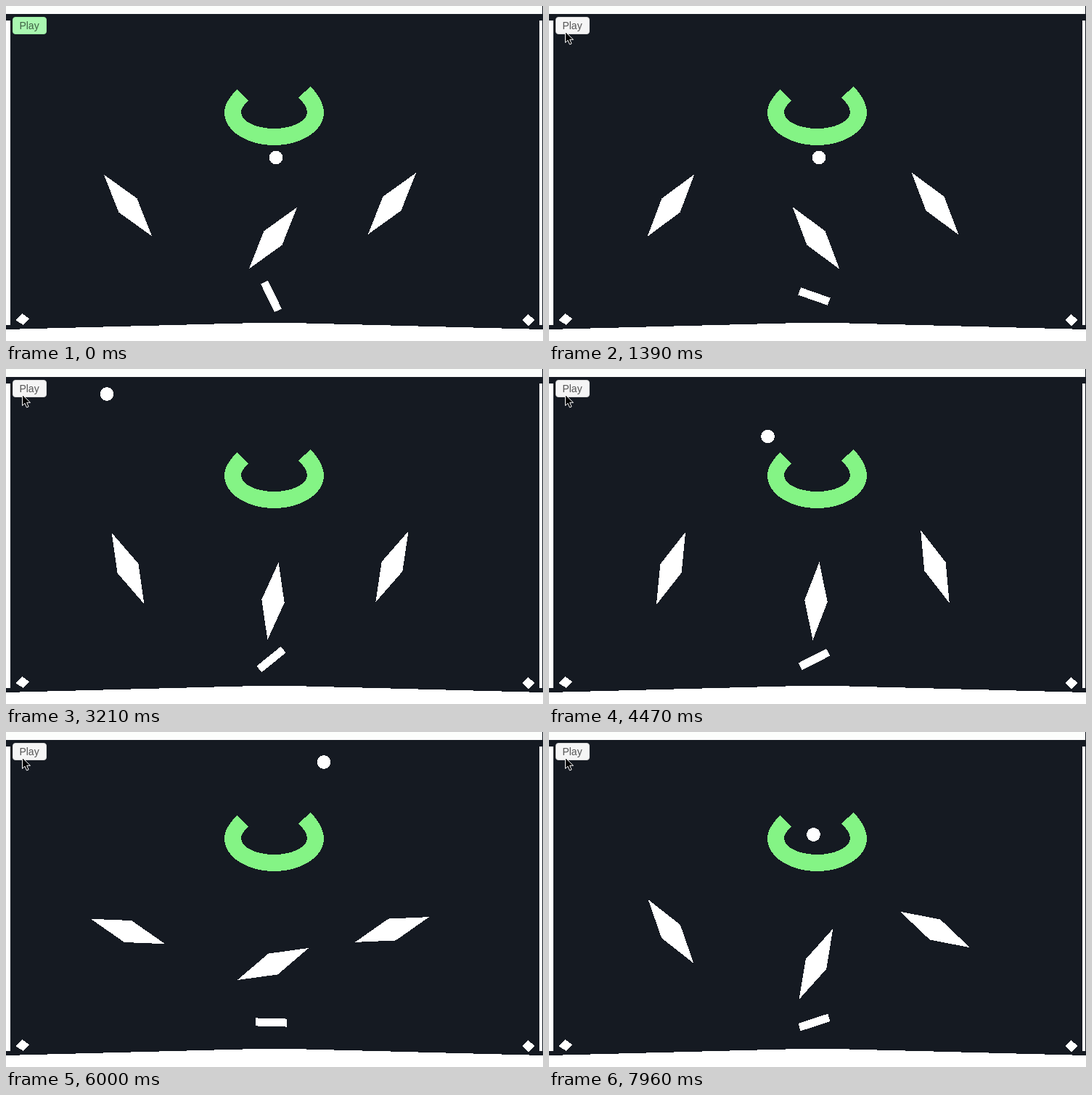
Animation of 740 by 462 pixels, one loop 8000 ms. Source, as an HTML page:

```html
<!DOCTYPE html>
<html lang="en">
<head>
<meta charset="utf-8">
<title>Spinner pinball</title>
<style>
  html, body { margin: 0; width: 100%; height: 100%; overflow: hidden; background: #fff; }
  svg { display: block; width: 740px; height: 462px; }
  text { font: 14px "Liberation Sans", Arial, sans-serif; }
</style>
</head>
<body>
<svg viewBox="0 0 740 462">
  <defs><path id="blade" d="M-54 0L0 -15.8L54 0L0 15.8Z"/></defs>
  <g shape-rendering="crispEdges">
    <rect width="740" height="462" fill="#fff"/>
    <rect width="740" height="11" fill="#fcfefc"/>
    <g fill="#151a22">
      <rect y="11" width="740" height="9"/>
      <rect x="6" y="11" width="729" height="435"/>
      <rect y="440" width="740" height="6"/>
      <rect x="739" width="1" height="462"/>
    </g>
    <g fill="#fff">
      <path d="M0 446L345 437H395L740 446V462H0Z"/>
      <path d="M13 433L22 424L32 431L24 440Z"/>
      <path d="M711 433L719 425L729 433L720 441Z"/>
      <circle id="ball" r="9.4"/>
      <use id="left" href="#blade"/>
      <use id="right" href="#blade"/>
      <use id="middle" href="#blade"/>
      <rect id="bar" x="-21.5" y="-5.5" width="43" height="11"/>
    </g>
    <path fill="#84f485" d="M318.5 115L334 131Q324 139 324 146.5A45.5 22.5 0 0 0 415 146.5Q415 138 403 126L420 111Q438 131 438 147A68.5 45 0 0 1 301 147Q301 132 318.5 115Z"/>
  </g>
  <rect id="button" x="9.5" y="15.5" width="46" height="23" rx="3.5"/>
  <text id="label" x="18.4" y="32">Play</text>
  <path id="cursor" d="M0 0V15L3.5 11.8L6 17.5L8.6 16.4L6.2 10.8H11Z" fill="#000" stroke="#fff"/>
</svg>
<script>
  const LOOP = 8000;
  const $ = id => document.getElementById(id);

  // Angles in degrees that each spinner passes at the shared moments
  const moments = [0, 1390, 3210, 4470, 6000, 7120, 7960];
  const spinners = [
    { id: 'left', x: 168, y: 275, angles: [52, -53, -114.5, -248.2, -341.4, -540, -665.5] },
    { id: 'right', x: 532, y: 272.5, angles: [128, 233, 294.8, 428.5, 521.2, 683.2, 747.3] },
    { id: 'middle', x: 368, y: 320, angles: [128, 233, 278.1, 454.8, 515.8, 675.4, 835.6] },
    { id: 'bar', x: 365.5, y: 400.5, angles: [64, 19.3, -39, -207, -358.5, -460, -558] }
  ];

  // The ball flies straight from stop to stop, rebounding off the walls;
  // hits counts the rebounds on the way there, signed by the first direction.
  const walls = { x: [19, 719], y: [20, 427] };
  const stops = [
    { time: 1440, x: 372, y: 209 },
    { time: 3210, x: 139, y: 34.5, hits: { x: 5, y: 5 } },
    { time: 4470, x: 301.5, y: 93, hits: { x: -1, y: -2 } },
    { time: 6000, x: 438, y: 41.5, hits: { x: -1, y: -2 } },
    { time: 7120, x: 497, y: 41, hits: { x: 0, y: -1 } },
    { time: 7960, x: 364.5, y: 141.5, hits: { x: 2, y: 2 } }
  ];

  const mix = (a, b, part) => a + (b - a) * part;
  const clamp = v => Math.min(1, Math.max(0, v));

  function segment(times, time) {
    const last = times.length - 2;
    const i = Math.min(last, Math.max(0, times.findLastIndex(t => t <= time)));
    return [i, clamp((time - times[i]) / (times[i + 1] - times[i]))];
  }

  function rebound(from, to, hits, [low, high], part) {
    const span = high - low;
    const image = (hits % 2 ? low + high - to : to) + hits * span;
    const offset = mix(from, image, part) - low;
    const wrapped = ((offset % (2 * span)) + 2 * span) % (2 * span);
    return low + (wrapped > span ? 2 * span - wrapped : wrapped);
  }

  function ballAt(time) {
    const [i, part] = segment(stops.map(stop => stop.time), time);
    const from = stops[i], to = stops[i + 1];
    return ['x', 'y'].map(axis => rebound(from[axis], to[axis], to.hits[axis], walls[axis], part));
  }

  // The pointer comes up the left edge, then moves down onto the button
  function cursorAt(time) {
    const rise = clamp((time - 300) / 300), settle = clamp((time - 600) / 370);
    return [mix(1, 22.5, settle), mix(414, 2, rise) + 33.5 * settle];
  }

  // The picture advances in 70 ms ticks, with two shorter ones
  function tick(time) {
    if (time < 60) return 0;
    const start = time < 4530 ? 60 : 4530;
    return start + Math.floor((time - start) / 70) * 70;
  }

  const place = (id, [x, y], angle = 0) =>
    $(id).setAttribute('transform', `translate(${x} ${y}) rotate(${angle})`);

  function draw(time) {
    const [i, part] = segment(moments, time);
    for (const { id, x, y, angles } of spinners) place(id, [x, y], mix(angles[i], angles[i + 1], part));
    place('ball', ballAt(time));
    place('cursor', cursorAt(time));
    $('cursor').style.display = time < 300 ? 'none' : '';
    const hover = time >= 940;
    $('button').setAttribute('fill', hover ? '#f5f5f5' : '#aaf7b1');
    $('button').setAttribute('stroke', hover ? '#d8d8d8' : '#9aeaa2');
    $('label').setAttribute('fill', hover ? '#555' : '#3f6144');
  }

  const begin = performance.now();
  function frame() {
    draw(tick((performance.now() - begin) % LOOP));
    requestAnimationFrame(frame);
  }
  frame();
</script>
</body>
</html>
```
